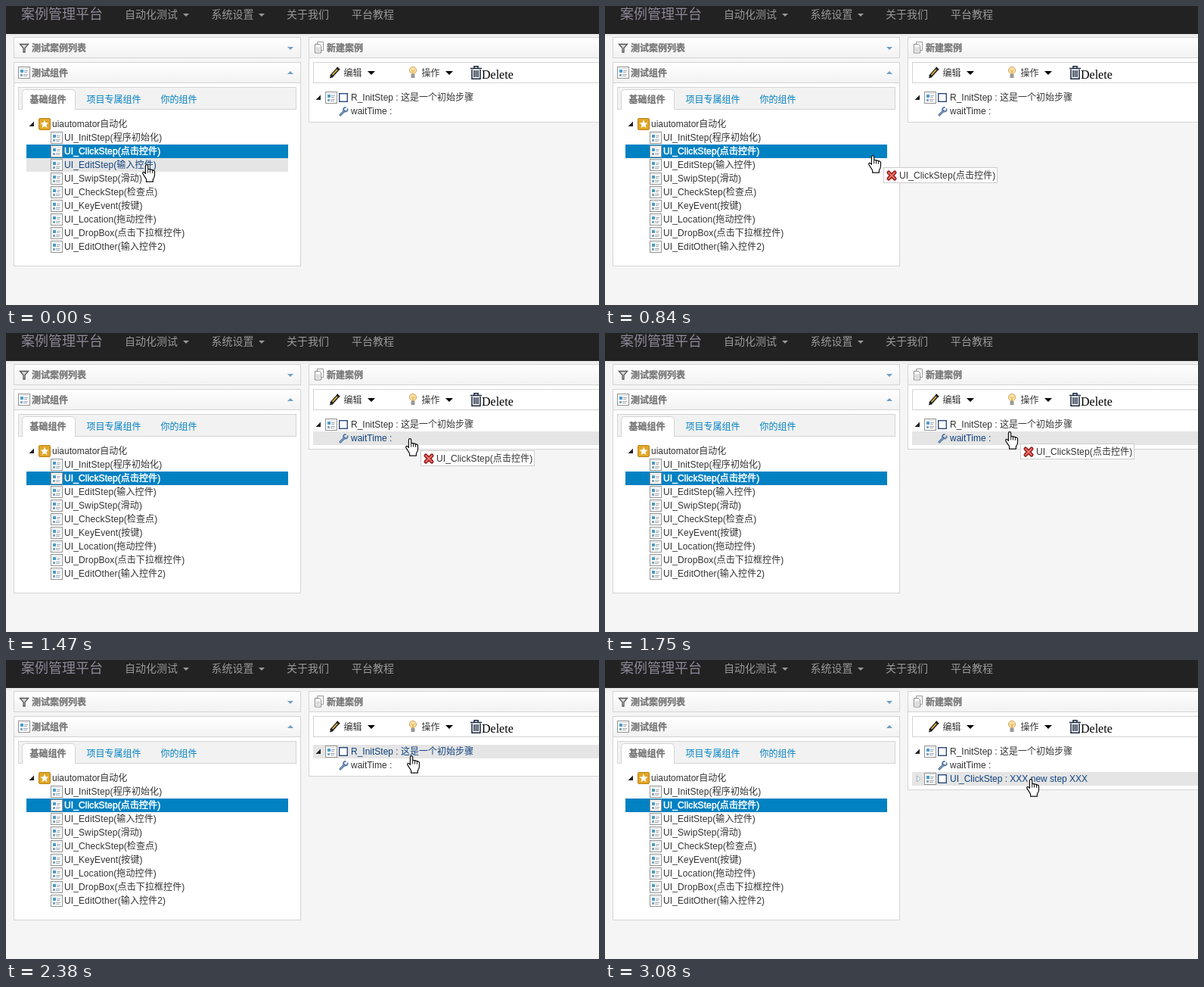
An HTML page that plays this animation: 784 by 395 pixels, repeating every 3150 ms.

```html
<!DOCTYPE html>
<html lang="zh-CN">
<head>
<meta charset="utf-8">
<title>案例管理平台</title>
<style>
html, body { margin: 0; width: 100%; height: 100%; overflow: hidden; background: #f5f5f5; }
svg { display: block; }
text { font: 12px "Liberation Sans", Arial, "Noto Sans CJK SC", "Noto Sans CJK", sans-serif; fill: #333; white-space: pre; }
.nav { font-size: 14px; fill: #999; }
.brand { font-size: 18px; fill: #8e8799; }
.title { font-weight: bold; fill: #777; stroke: #777; stroke-width: .3px; }
.link { fill: #0081c2; }
.step { letter-spacing: .11px; }
.picked { fill: #fff; stroke: #fff; stroke-width: .5px; }
.serif { font: 16px "Liberation Serif", "Times New Roman", serif; fill: #000; }
.box { fill: #fff; stroke: #d4d4d4; }
.hover text { fill: #10437f; }
.hover .row { fill: #e5e5e5; }
.row { fill: none; }
</style>
</head>
<body>
<svg id="stage" width="784" height="395" viewBox="0 0 784 395">
  <defs>
    <linearGradient id="head" x2="0" y2="1"><stop stop-color="#fff"/><stop offset="1" stop-color="#f2f2f2"/></linearGradient>
    <linearGradient id="shade" x2="0" y2="1"><stop stop-color="#000" stop-opacity=".05"/><stop offset="1" stop-color="#000" stop-opacity="0"/></linearGradient>
    <g id="form">
      <rect x=".5" y=".5" width="15" height="15" fill="#fff" stroke="#929292"/>
      <path d="M2 2.5H14" stroke="#d3dbe0"/>
      <path d="M3 4h4v4H3z" fill="#4a9cc9"/>
      <path d="M3 10h3v3H3z" fill="#7ba6bd"/>
      <path d="M8 5.5h5M8 7.5h4M7 10.5h6M7 12.5h5" stroke="#a0a8ad"/>
    </g>
    <g id="star">
      <rect x=".5" y=".5" width="15" height="15" rx="1.5" fill="#e2a626" stroke="#b98418"/>
      <path d="M8 2.6 9.6 6.3 13.5 6.6 10.5 9.1 11.5 13 8 10.9 4.5 13 5.5 9.1 2.5 6.6 6.4 6.3Z" fill="#fff"/>
    </g>
    <g id="wrench" fill="none" stroke-linecap="round">
      <path d="M2 11 7.5 5.5" stroke="#4a6f9f" stroke-width="3"/>
      <path d="M11.6 3.2A2.8 2.8 0 1 1 8.8 .9" stroke="#5d7fa9" stroke-width="2"/>
      <path d="M2 11 6.5 6.5" stroke="#9db8d8"/>
    </g>
    <rect id="check" x=".7" y=".7" width="10.6" height="10.6" fill="#fff" stroke="#2b4a7c" stroke-width="1.4"/>
    <path id="open" d="M6.5 0V6.5H0Z" fill="#222"/>
    <path id="closed" d="M.5 .5 5 4.5 .5 8.5Z" fill="#fff" stroke="#9bb0ba"/>
    <path id="caret" d="M0 0H10L5 5Z"/>
    <g id="hand" stroke="#111" stroke-linejoin="round">
      <path d="M6 .6Q4.4 .6 4.4 2.4V12.4L2.9 10.8Q1.4 9.7 .7 11.2 .5 12.2 1.2 13.2L4.6 18.4 5.6 20.2V23.2H14.4V20.2Q16.5 17.4 16.5 14.6V9.6Q16.2 8 14.7 8.1 13.9 7 12.2 7.4 11.2 6.4 9.7 6.8 8.8 6.1 7.7 6.4V2.4Q7.7 .6 6 .6Z" fill="#fff" stroke-width="1.2"/>
      <path d="M7.7 6.4V11.5M10.5 7.2V11.5M13.4 8V11.8" fill="none"/>
    </g>
    <g id="no" stroke-linecap="round">
      <path d="M3 3 11 11M11 3 3 11" stroke="#7d1714" stroke-width="5"/>
      <path d="M3 3 11 11M11 3 3 11" stroke="#dc4a43" stroke-width="2.8"/>
      <path d="M3 3 11 11M11 3 3 11" stroke="#fff" stroke-opacity=".45" stroke-width=".9"/>
    </g>
    <path id="yes" d="M2 8 5.5 11.5 12 3" fill="none" stroke="#3c9a2e" stroke-width="3" stroke-linecap="round"/>
  </defs>
</svg>
<script>
const LOOP = 3150, STEP = 70, ROW = 18;
const stage = document.getElementById("stage");

const text = (x, y, s, cls = "") => `<text x="${x}" y="${y}" class="${cls}">${s}</text>`;
const use = (id, x, y, more = "") => `<use href="#${id}" x="${x}" y="${y}" ${more}/>`;
const rect = (x, y, w, h, more) => `<rect x="${x}" y="${y}" width="${w}" height="${h}" ${more}/>`;
const box = (x, y, w, h, more = "") => rect(x + .5, y + .5, w - 1, h - 1, `class="box" ${more}`);
const header = (x, y, w) => box(x, y, w, 28, 'style="fill:url(#head)"');
const row = (id, x, y, w, body) => `<g id="${id}">${rect(x, y, w, ROW, 'class="row"')}${body}</g>`;

const steps = ["InitStep(程序初始化)", "ClickStep(点击控件)", "EditStep(输入控件)", "SwipStep(滑动)",
  "CheckStep(检查点)", "KeyEvent(按键)", "Location(拖动控件)", "DropBox(点击下拉框控件)", "EditOther(输入控件2)"];
const PICKED = 1;

function navBar() {
  return rect(0, 37, 784, 5, 'fill="url(#shade)"') + rect(0, 0, 784, 37, 'fill="#222"') +
    text(20, 17, "案例管理平台", "brand") + text(157, 16, "自动化测试", "nav") +
    text(271.5, 16, "系统设置", "nav") + text(371, 16, "关于我们", "nav") + text(457, 16, "平台教程", "nav") +
    '<path d="M234 10h8l-4 4zM334 10h8l-4 4z" fill="#999"/>';
}

function leftSide() {
  const rows = steps.map((name, i) => {
    const y = 165 + i * ROW, on = i === PICKED;
    return row("left" + i, 27, y, 346,
      (on ? rect(27, y, 346, ROW, 'fill="#0081c2"') : "") +
      use("form", 59, y + 1) + text(77, y + 13, "UI_" + name, on ? "step picked" : "step"));
  }).join("");
  return header(10, 41, 380) + text(34, 60, "测试案例列表", "title") +
    '<path d="M18.5 50.5H29.5L25 55.5V61H23V55.500Z" fill="#ddd" stroke="#555" stroke-width="1.3"/>' +
    '<path d="M372 54h8l-4 4z" fill="#6f9fc0"/>' +
    box(10, 74, 380, 270) + header(10, 74, 380) + use("form", 16, 80) + text(34, 92.5, "测试组件", "title") +
    '<path d="M372 90h8l-4-4z" fill="#6f9fc0"/>' +
    box(16, 107, 368, 30, 'style="fill:#f2f2f2"') +
    '<path d="M21.5 137V114.5q0-4 4-4H87.5q4 0 4 4V137" class="box"/>' +
    text(31.5, 127.5, "基础组件", "title") + text(106.5, 127.5, "项目专属组件", "link") + text(204.5, 127.5, "你的组件", "link") +
    use("open", 30.5, 152.5) + use("star", 43, 148) + text(61, 160, "uiautomator自动化") + rows;
}

function toolBar() {
  return box(406, 74, 390, 28) +
    '<path d="M430 93 439 83" stroke="#222" stroke-width="4.5"/><path d="M431.5 91 438 84" stroke="#e8b83a" stroke-width="1.8"/>' +
    '<path d="M428 95.5 429 91 432.5 94Z" fill="#222"/><path d="M438.5 83.5 440 82" stroke="#222" stroke-width="5"/>' +
    text(446.5, 92.5, "编辑") + use("caret", 478, 86) +
    '<circle cx="538" cy="85" r="4.6" fill="#fbe0a0" stroke="#cfa765"/><path d="M535.5 90h5v5h-5z" fill="#999"/>' +
    '<path d="M536 84.5l2 2 2-2M538 86.5V90" fill="none" stroke="#d79a34"/>' +
    text(549.5, 92.5, "操作") + use("caret", 581, 86) +
    '<g fill="none" stroke="#15233a" stroke-width="1.5"><path d="M614 82.5H629M619 82V79.75H624V82M616 84V96.25H627V84M619 85V94M621.5 85V94M624 85V94"/></g>' +
    text(629, 96, "Delete", "serif");
}

function rightSide() {
  const x = 406, w = 378;
  return '<rect id="body" class="box" x="400.5" y="41.5" width="395"/>' + header(400, 41, 396) +
    '<path d="M411.5 47.5h8v11h-8z" fill="#fff" stroke="#999"/><path d="M408.5 50.5h6l2 2v9.5h-8z" fill="#fff" stroke="#888"/>' +
    '<path d="M410 55.5h5M410 57.5h5M410 59.5h5" stroke="#bbb"/>' +
    text(424, 60, "新建案例", "title") + toolBar() +
    row("right0", x, 112, w, use("open", 409.5, 117.5) + use("form", 422, 113) + use("check", 440, 115) +
      text(456, 125, "R_InitStep : 这是一个初始步骤")) +
    row("right1", x, 130, w, use("wrench", 440, 133) + text(456, 143, "waitTime :")) +
    row("right2", x, 148, w, use("closed", 412, 152.5) + use("form", 422, 149) + use("check", 440, 151) +
      text(456, 161, "UI_ClickStep : XXX new step XXX")) +
    '<path id="drop" d="M406 129.5H784" stroke="#f00" stroke-dasharray="1 1"/>';
}

stage.insertAdjacentHTML("beforeend", navBar() + leftSide() + rightSide() +
  `<g id="ghost">${box(0, 0, 151, 21, 'style="stroke:#ccc"')}${use("no", 4, 4)}${use("yes", 4, 4)}` +
  `${text(21, 15, "UI_" + steps[PICKED], "step")}</g>` + use("hand", 0, 0, 'id="cursor"'));

const el = id => document.getElementById(id);
const [ghost, cursor, body, drop] = ["ghost", "cursor", "body", "drop"].map(el);
const [no, yes] = ghost.querySelectorAll("use");
const show = (node, on) => node.setAttribute("display", on ? "inline" : "none");

// Each move: start, end, target x, target y, sag
const START = [180, 209];
const moves = [
  [0, 140, 165, 187, 0], [560, 630, 172, 188, 0], [630, 1050, 523, 182, 12],
  [1120, 1470, 528, 139, 0], [1470, 1680, 528, 132, 0], [1680, 1750, 529, 130, 0],
  [1890, 2030, 530, 126, 0], [2940, 3080, 557, 157, 0]
];
const ease = p => p * p * (3 - 2 * p);

function pointer(t) {
  let [x, y] = START;
  for (const [a, b, tx, ty, sag] of moves) {
    if (t <= a) break;
    const p = ease(Math.min(1, (t - a) / (b - a)));
    x += (tx - x) * p;
    y += (ty - y) * p + sag * Math.sin(Math.PI * p);
  }
  return [Math.round(x), Math.round(y)];
}

function draw(time) {
  const t = Math.floor(time % LOOP / STEP) * STEP;
  const [x, y] = pointer(t);
  const dragging = t >= 630 && t < 2380, added = t >= 2590;
  const left = !dragging && x < 373 ? Math.floor((y - 165) / ROW) : -1;
  const right = x > 406 ? Math.floor((y - 112) / ROW) : -1;

  steps.forEach((_, i) => el("left" + i).classList.toggle("hover", i === left && i !== PICKED));
  for (let i = 0; i < 3; i++) el("right" + i).classList.toggle("hover", i === right);
  show(el("right2"), added);
  body.setAttribute("height", added ? 130 : 112);

  const droppable = dragging && right === 0;
  show(drop, droppable);
  show(yes, droppable);
  show(no, !droppable);
  show(ghost, dragging);
  ghost.setAttribute("transform", `translate(${x + 20} ${y + 16})`);
  cursor.setAttribute("transform", `translate(${x} ${y})`);
}

function tick() {
  draw(performance.now());
  requestAnimationFrame(tick);
}
tick();
</script>
</body>
</html>
```
